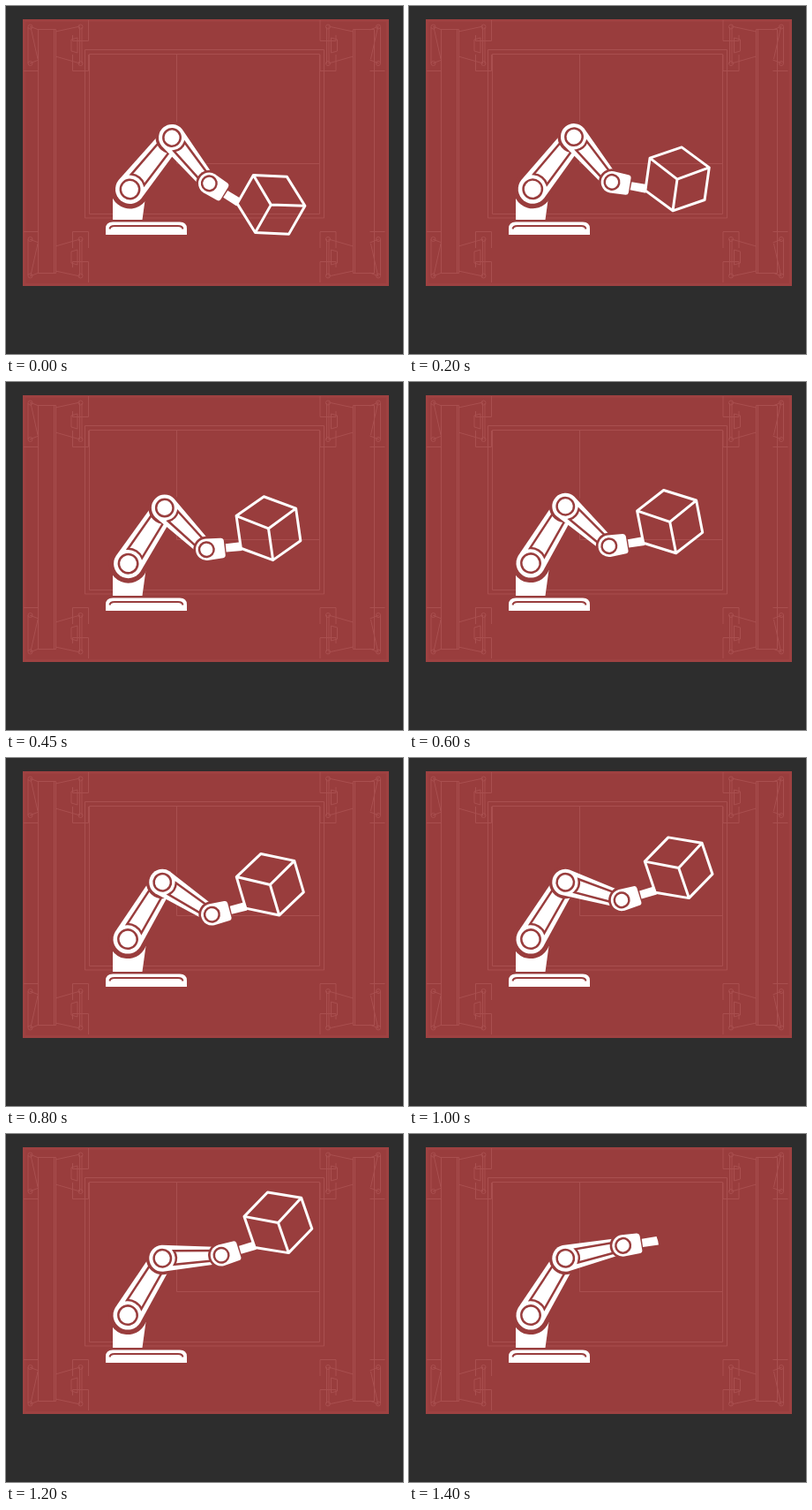
An HTML page for the animation above (1.9 s loop, 450x394 px).

```html
<!DOCTYPE html>
<html lang="en">
<head>
<meta charset="utf-8">
<title>Robot arm</title>
<style>
  html, body { margin: 0; width: 100%; height: 100%; overflow: hidden; background: #2d2d2d; }
  svg { display: block; }
  .plan { fill: none; stroke: #a94f4f; }
  .white { fill: #fff; }
  .red { fill: #993d3d; }
  .groove { fill: none; stroke: #993d3d; stroke-width: 2.5; }
</style>
</head>
<body>
<svg width="450" height="394" viewBox="0 0 450 394">
  <defs>
    <g id="corner">
      <path d="M20 73.5H37M75.5 55V73.5H93.5V55M93.5 16V39.5H75.5V33"/>
      <path d="M74 38L81 36V53L74 51ZM83.5 24V65M86 24V65M27 23L37 27M27 65L37 61M25 24V65M28 24L36 60M56 29L84 23M56 57L84 65"/>
      <circle cx="27.5" cy="23.5" r="2.5"/><circle cx="84.5" cy="23.5" r="2.5"/>
      <circle cx="27.5" cy="65" r="2.5"/><circle cx="84.5" cy="65" r="2.5"/>
    </g>
    <g id="side">
      <use href="#corner"/>
      <use href="#corner" transform="translate(0 329) scale(1 -1)"/>
    </g>
  </defs>

  <rect class="red" x="19" y="15" width="415" height="302"/>
  <g class="plan">
    <rect x="20.5" y="16.5" width="412" height="299" stroke="#9e4141" stroke-width="3"/>
    <path d="M89.5 49.5H360.5V240H89.5ZM94.5 54.5H355.5V235.5H94.5ZM193.5 54V178.5H356"/>
    <path d="M36.5 26.5H56.5V302.5H36.5ZM54.5 26V302M393.5 26.5H417.5V302.5H393.5ZM395.5 26V302"/>
    <use href="#side"/>
    <use href="#side" transform="translate(449.5 0) scale(-1 1)"/>
  </g>

  <path class="white" d="M113 259V252Q113 244.500 121 244.500H197Q205 244.500 205 252V259Z"/>
  <path class="groove" style="stroke-width:2" d="M117.500 252.500Q118 249 123 249H195Q200 249 200.500 252.500"/>
  <path class="white" d="M121 213H158.500L154.500 242H121Z"/>
  <g id="upper"></g>
  <g id="fore"></g>
  <g id="hand">
    <circle class="red" r="15"/>
    <path class="white" d="M0 -12.300L17 -11.500Q20 -11.300 20.300 -8.500L20.800 8Q20.800 10.800 18 11.200L0 12.300A12.300 12.300 0 0 1 0 -12.300Z"/>
    <circle class="groove" r="8.300"/>
    <path class="white" d="M22 -4.500L39 -5Q40.300 0 40 4.800L22 4.800Z"/>
    <path id="cube" fill="none" stroke="#fff" stroke-width="3" stroke-linejoin="round"
      d="M70 -54L105 -37.500L107 -.5L74 18.500L39 2L37 -35ZM37 -35L72 -17.500L105 -37.500M72 -17.500L74 18.500"/>
  </g>
</svg>
<script>
const LOOP = 1900, STEP = 50, UPPER = 75.4, FORE = 66.9;
const $ = id => document.getElementById(id);

// Tapered arm segment along x, with a ring at its first joint and a grooved inner bar.
function link(id, length, r1, r2, halo, ring, bar1, bar2) {
  const arc = r1 + .5, x = Math.sqrt(arc * arc - bar1 * bar1);
  $(id).innerHTML = `
    <circle class="red" r="${halo}"/>
    <path class="white" d="M0 ${-r1}L${length} ${-r2}V${r2}L0 ${r1}A${r1} ${r1} 0 0 1 0 ${-r1}Z"/>
    <path class="groove" d="M${length} ${-bar2}L${x} ${-bar1}A${arc} ${arc} 0 0 1 ${x} ${bar1}L${length} ${bar2}"/>
    <circle class="groove" r="${ring}"/>`;
}
link('upper', UPPER, 16.5, 13, 22, 10.7, 9.5, 7.5);
link('fore', FORE, 15, 9.2, 18.5, 9.7, 7.8, 5.2);

const progress = (t, from, to) => Math.max(0, Math.min(1, (t - from) / (to - from)));
const easeIn = (k, power) => k ** power;
const easeOut = (k, power) => 1 - (1 - k) ** power;

function place(id, x, y, angle, length = 0) {
  $(id).setAttribute('transform', `translate(${x} ${y}) rotate(${angle})`);
  const rad = angle * Math.PI / 180;
  return [x + length * Math.cos(rad), y + length * Math.sin(rad)];
}

function draw(now) {
  const t = Math.floor(now % LOOP / STEP) * STEP;
  const swing = progress(t, 0, 500), lean = easeIn(swing, 2.5);
  const lift = easeIn(progress(t, 550, 1280), 1.6);
  const tilt = easeOut(progress(t, 550, 1150), 2.5);
  const release = progress(t, 1250, 1400);

  const elbow = place('upper', 140.5 - 2.5 * lean, 207.5 - 2.4 * lean, -50.9 - 7.7 * lean, UPPER);
  const wrist = place('fore', ...elbow, 50.8 - 7.8 * lean - 55.4 * lift, FORE);
  place('hand', ...wrist, 32.8 - 38.8 * easeOut(swing, 1.6) - 10 * tilt + 8 * release);
  $('cube').setAttribute('opacity', 1 - release);
}

const start = performance.now();
function tick() {
  draw(performance.now() - start);
  requestAnimationFrame(tick);
}
tick();
</script>
</body>
</html>
```
